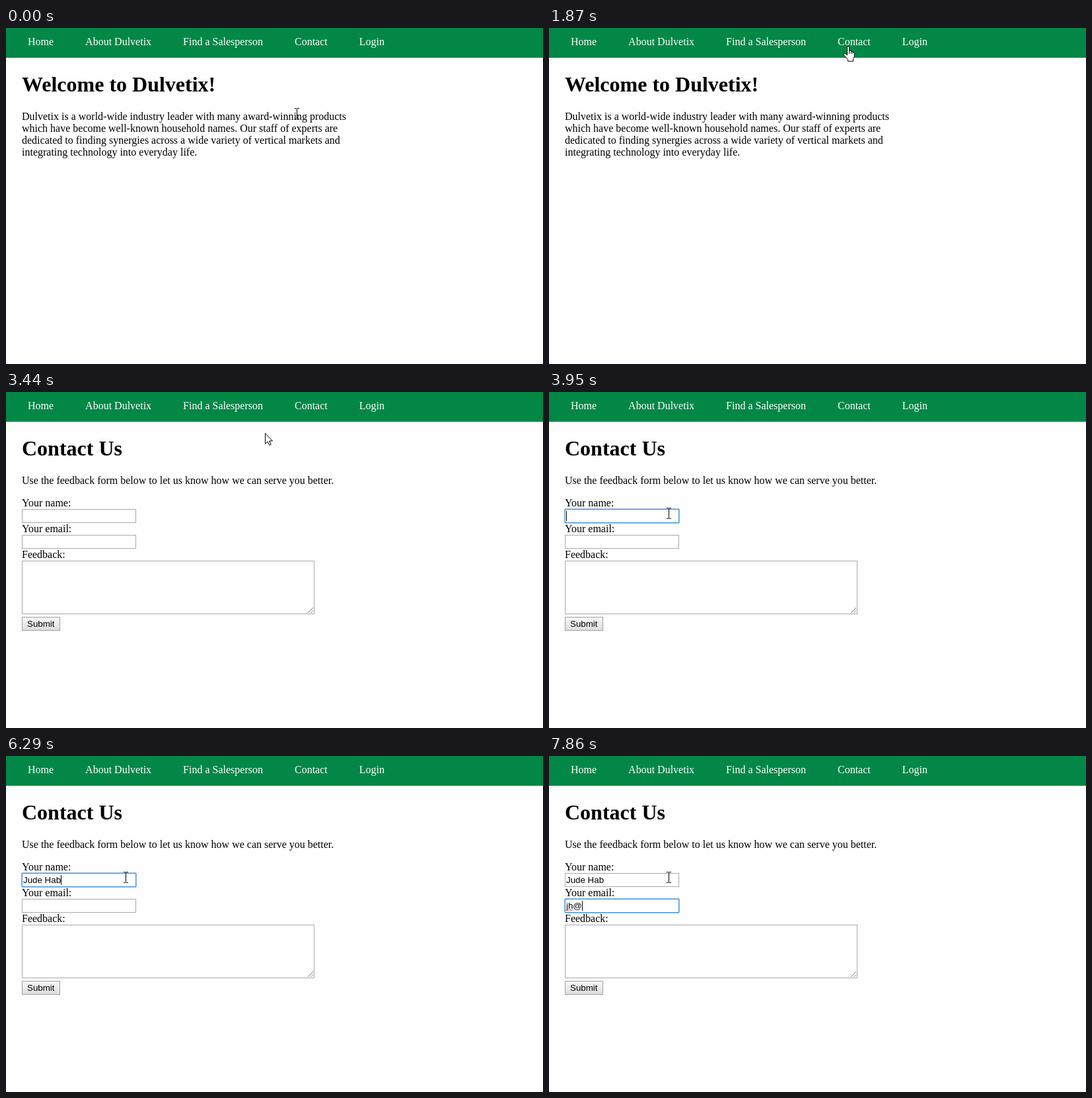
Write an HTML page with a canvas that moves like this. It is 813x508 px and loops after 8000 ms.

```html
<!DOCTYPE html>
<html lang="en">
<head>
<meta charset="utf-8">
<title>Contact form</title>
<style>
html, body { margin: 0; width: 100%; height: 100%; overflow: hidden; background: #fefefe; }
canvas { display: block; }
</style>
</head>
<body>
<canvas id="stage" width="813" height="508"></canvas>
<script>
const ctx = document.getElementById('stage').getContext('2d');
const LOOP = 8000;
const SERIF = '"Liberation Serif", "Times New Roman", serif';
const SANS = '13.333px "Liberation Sans", Arial, sans-serif';
const BODY = '16px ' + SERIF;
const TITLE = 'bold 32px ' + SERIF;

const NAV = ['Home', 'About Dulvetix', 'Find a Salesperson', 'Contact', 'Login'];
const INTRO = [
  'Dulvetix is a world-wide industry leader with many award-winning products',
  'which have become well-known household names. Our staff of experts are',
  'dedicated to finding synergies across a wide variety of vertical markets and',
  'integrating technology into everyday life.'
];

// [time, shape, x, y] of the shape's top left corner
const POINTER = [
  [0, 'beam', 437, 121],
  [840, 'arrow', 421, 109],
  [960, 'arrow', 414, 100],
  [1110, 'arrow', 437, 62],
  [1230, 'arrow', 450, 41],
  [1380, 'hand', 445, 31],
  [1500, 'hand', 445, 28],
  [1870, 'hand', 445, 27]
];
// Sweep from the menu down to the name field
const GLIDE = { start: 3200, step: 122, from: [451, 29], to: [184, 180], parts: [0.05, 0.22, 0.48, 0.75, 0.93] };
GLIDE.parts.forEach((p, i) => {
  const at = k => Math.round(GLIDE.from[k] + (GLIDE.to[k] - GLIDE.from[k]) * p);
  POINTER.push([GLIDE.start + i * GLIDE.step, 'arrow', at(0), at(1)]);
});
POINTER.push([3810, 'beam', 178, 175]);

// [time, name, email, focused field, caret shown]
const FORM = [
  [2780, '', '', 0, false],
  [3950, '', '', 1, true],
  [4380, '', '', 1, false],
  [4500, 'J', '', 1, true],
  [4620, 'Ju', '', 1, true],
  [4770, 'Jud', '', 1, true],
  [5020, 'Jude ', '', 1, true],
  [5610, 'Jude ', '', 1, false],
  [5730, 'Jude H', '', 1, true],
  [6010, 'Jude Ha', '', 1, true],
  [6290, 'Jude Hab', '', 1, true],
  [6440, 'Jude Hab', '', 2, true],
  [7020, 'Jude Hab', 'j', 2, true],
  [7460, 'Jude Hab', 'jh', 2, true],
  [7860, 'Jude Hab', 'jh@', 2, true]
];

const stateAt = (list, t) => list.filter(row => row[0] <= t).pop();

function rect(x, y, w, h, color) {
  ctx.fillStyle = color;
  ctx.fillRect(x, y, w, h);
}

function frame(x, y, w, h, color) {
  ctx.strokeStyle = color;
  ctx.lineWidth = 1;
  ctx.strokeRect(x + 0.5, y + 0.5, w - 1, h - 1);
}

function text(str, x, y, font = BODY, color = '#000') {
  ctx.font = font;
  ctx.fillStyle = color;
  ctx.fillText(str, x, y);
}

function line(color, ...pts) {
  ctx.strokeStyle = color;
  ctx.lineWidth = 1;
  ctx.beginPath();
  pts.forEach(([x, y]) => ctx.lineTo(x, y));
  ctx.stroke();
}

function drawNav() {
  rect(0, 0, 813, 45, '#038747');
  let x = 33;
  for (const item of NAV) {
    text(item, x, 26, BODY, '#fff');
    x += ctx.measureText(item).width + 48;
  }
}

function drawHome() {
  text('Welcome to Dulvetix!', 24, 96, TITLE);
  INTRO.forEach((row, i) => text(row, 24, 139 + i * 18));
}

function drawField(y, value, focused, caret) {
  rect(24, y, 173, 21, '#fff');
  frame(24, y, 173, 21, '#a9a9a9');
  if (focused) {
    ctx.strokeStyle = 'rgba(77, 151, 224, 0.6)';
    ctx.beginPath();
    ctx.roundRect(23.5, y - 0.5, 174, 22, 1.5);
    ctx.stroke();
    frame(24, y, 173, 21, '#4d97e0');
  }
  text(value, 26, y + 15, SANS);
  if (caret) {
    const end = 26 + ctx.measureText(value).width;
    rect(Math.round(end - 0.1), y + 3, 1, 15, '#000');
  }
}

function drawSquiggle(x, y, w) {
  const pts = [];
  for (let i = 0; i <= w; i += 2) pts.push([x + i, y + (i % 4 ? 0 : 1.6)]);
  line('#e33', ...pts);
}

function drawContact([, name, email, focus, caret]) {
  text('Contact Us', 24, 96, TITLE);
  text('Use the feedback form below to let us know how we can serve you better.', 24, 139);
  text('Your name:', 24, 173);
  text('Your email:', 24, 212);
  text('Feedback:', 24, 251);
  drawField(177, name, focus === 1, caret && focus === 1);
  drawField(216, email, focus === 2, caret && focus === 2);
  if (email.includes('@')) drawSquiggle(26, 232, 10);

  rect(24, 255, 443, 81, '#fff');
  frame(24, 255, 443, 81, '#a9a9a9');
  line('#777', [457, 334], [465, 326]);
  line('#777', [461.5, 334], [465, 330.5]);

  const face = ctx.createLinearGradient(0, 340, 0, 361);
  face.addColorStop(0, '#f8f8f8');
  face.addColorStop(1, '#dddddd');
  rect(24, 340, 58, 21, face);
  frame(24, 340, 58, 21, '#a0a0a0');
  text('Submit', 32, 355, SANS);
}

const SHAPES = {
  arrow: new Path2D('M.5 .5V16.5L4.3 13L6.8 18.5L9.2 17.4L6.8 12H11.5Z'),
  hand: new Path2D('M6.5 14V2Q6.5 .5 8 .5T9.5 2V7.5Q12 6.6 12.4 8.5Q14.6 7.7 15 9.7' +
    'Q17.5 9 17.5 11.5V15.5L15.5 19.5V23.3H7.5V20.5L1.2 13.8Q.2 11.6 2.2 11.2Q3.6 11.2 6.5 14Z')
};
const KNUCKLES = new Path2D('M9.5 7.5V12M12.4 8.5V12M15 9.7V12.5');

function drawPointer([, shape, x, y]) {
  if (shape === 'beam') {
    for (const dy of [0, 16]) {
      rect(x, y + dy, 3, 1, '#000');
      rect(x + 4, y + dy, 3, 1, '#000');
    }
    rect(x + 3, y + 1, 1, 15, '#000');
    return;
  }
  ctx.save();
  ctx.translate(x, y);
  ctx.lineWidth = 1;
  ctx.fillStyle = '#fff';
  ctx.strokeStyle = '#000';
  ctx.fill(SHAPES[shape]);
  ctx.stroke(SHAPES[shape]);
  if (shape === 'hand') ctx.stroke(KNUCKLES);
  ctx.restore();
}

function draw(t) {
  rect(0, 0, 813, 508, '#fefefe');
  drawNav();
  const form = stateAt(FORM, t);
  if (form) drawContact(form);
  else drawHome();
  drawPointer(stateAt(POINTER, t));
}

const start = performance.now();
function tick() {
  draw((performance.now() - start) % LOOP);
  requestAnimationFrame(tick);
}
tick();
</script>
</body>
</html>
```
